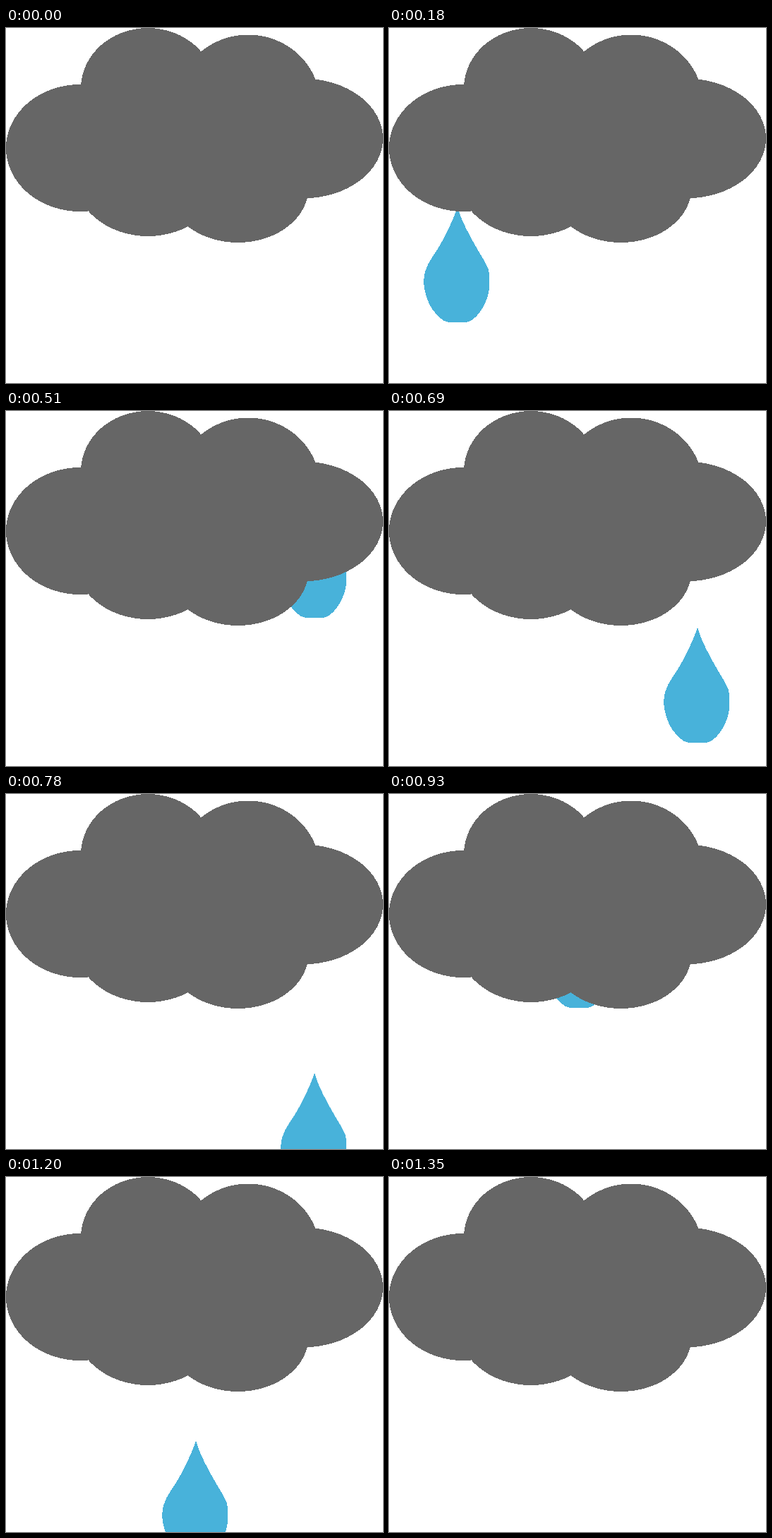
These frames come from a looping animation (534x503 px, 1380 ms). An HTML page:

```html
<!DOCTYPE html>
<html lang="en">
<head>
<meta charset="utf-8">
<title>Rain cloud</title>
<style>
  html, body { margin: 0; width: 100%; height: 100%; overflow: hidden; background: #fff; }
  svg { display: block; width: 534px; height: 503px; shape-rendering: crispEdges; }
  .cloud { fill: #666; }
  .drop {
    fill: #48b2da;
    animation: fall 1380ms var(--delay) infinite;
  }
  /* 450 ms of falling in 30 ms steps, then waiting below the stage */
  @keyframes fall {
    0% { transform: translateY(var(--from)); animation-timing-function: steps(15); }
    32.6087%, 100% { transform: translateY(var(--to)); }
  }
  .left   { --from: 86px;  --to: 506px;   --delay: -1ms; }
  .right  { --from: 71px;  --to: 513.5px; --delay: -931ms; }
  .middle { --from: 114px; --to: 504px;   --delay: -481ms; }
</style>
</head>
<body>
<svg viewBox="0 0 534 503">
  <defs>
    <path id="drop" d="M0 0C-7 20-17 41-28 59C-38 74-48 87-48 105C-47 123-40 143-28 153C-22 160-17 163-10 163H12C20 162 24 157 28 153C36 145 45 127 45 111V95C45 86 38 76 28 59C18 42 5 18 0 0Z"/>
  </defs>
  <g class="drop left"><use href="#drop" x="97"/></g>
  <g class="drop right"><use href="#drop" x="437"/></g>
  <g class="drop middle"><use href="#drop" x="269"/></g>
  <g class="cloud">
    <ellipse cx="105" cy="170" rx="105" ry="90"/>
    <ellipse cx="201" cy="85.5" rx="95" ry="85.5"/>
    <ellipse cx="343" cy="107.5" rx="102" ry="98"/>
    <ellipse cx="420" cy="156.5" rx="114" ry="85"/>
    <ellipse cx="201" cy="207.5" rx="105" ry="87.5"/>
    <ellipse cx="328.5" cy="226.5" rx="100" ry="77.5"/>
    <rect x="150" y="90" width="250" height="150"/>
  </g>
</svg>
</body>
</html>
```
